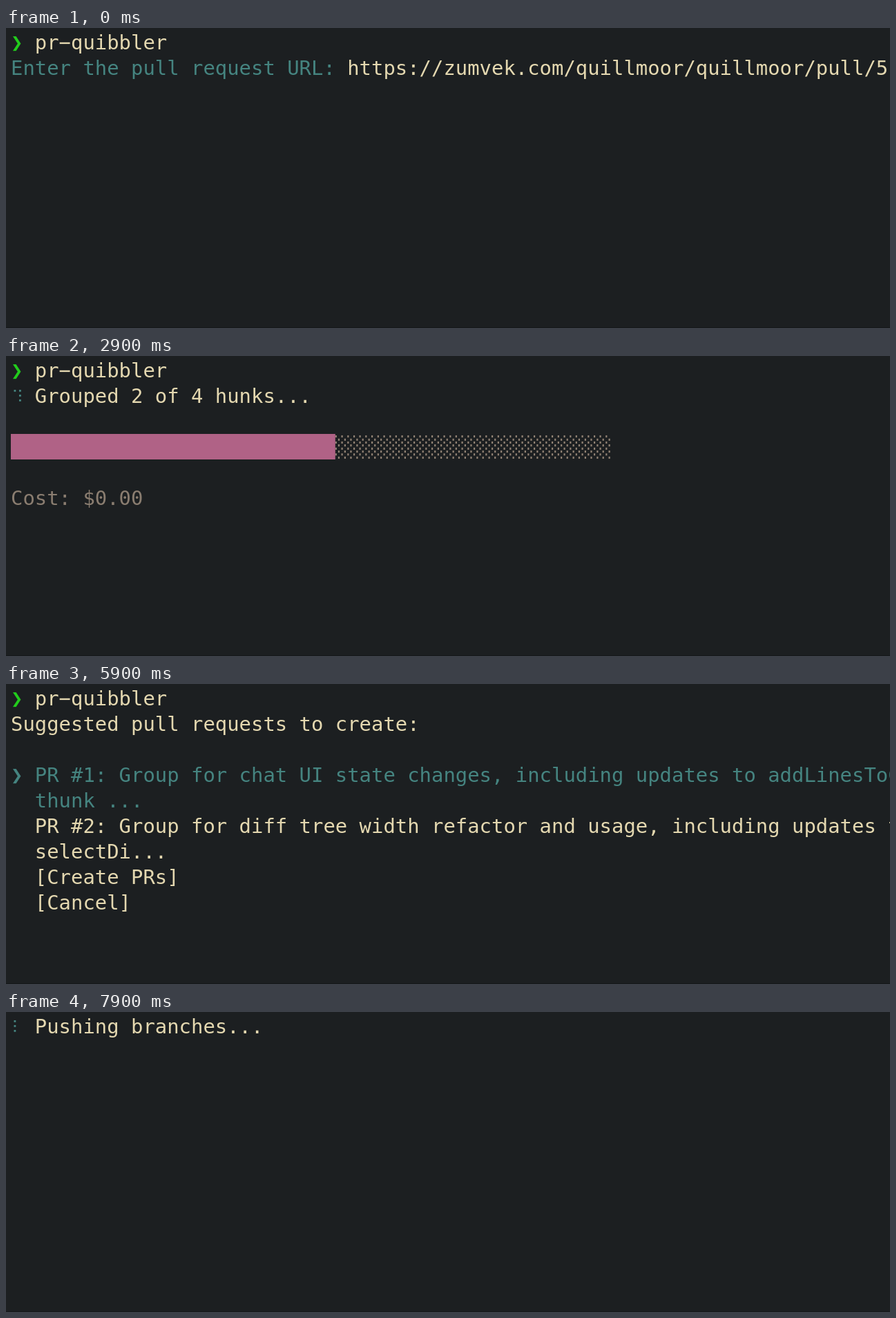
Recreate the animation shown at these times as an HTML page with a canvas. Size 1280x435 px, loop 8 s.

```html
<!DOCTYPE html>
<html lang="en">
<head>
<meta charset="utf-8">
<title>Terminal session</title>
<style>
  html, body { margin: 0; width: 100%; height: 100%; overflow: hidden; background: #1c1f21; }
  canvas { display: block; width: 1280px; height: 435px; }
</style>
</head>
<body>
<canvas id="stage" width="1280" height="435"></canvas>
<script>
const ctx = document.getElementById('stage').getContext('2d');
const LOOP = 8000, TICK = 100;
const LEFT = 7, CELL = 17.4, LINE = 37, BASE = 31, BAR_CELLS = 50;
const color = {
  back: '#1c1f21', text: '#e4d8b0', teal: '#458480', dim: '#8a7d70',
  green: '#22cc1c', pink: '#b06286', shade: '#928374'
};

const entries = [
  ['PR #1: Group for chat UI state changes, including updates to addLinesToC', 'thunk ...'],
  ['PR #2: Group for diff tree width refactor and usage, including updates to', 'selectDi...'],
  ['[Create PRs]'],
  ['[Cancel]']
];

// Each stage holds until the next one starts.
const stages = [
  { at: 0, draw: askUrl },
  { at: 500, draw: () => progress('Found 4 hunks in the PR #$51!', 9, '0.00') },
  { at: 1300, draw: t => progress('Grouped 0 of 4 hunks...', 17, '0.00', t) },
  { at: 2000, draw: t => progress('Grouped 1 of 4 hunks...', 22, '0.00', t) },
  { at: 2600, draw: t => progress('Grouped 2 of 4 hunks...', 27, '0.00', t) },
  { at: 3300, draw: t => progress('Grouped 3 of 4 hunks...', 32, '0.00', t) },
  { at: 3800, draw: t => progress('Refining groups...', 37, '0.01', t) },
  { at: 5000, draw: () => { prompt(); choices(1, 0); } },
  { at: 6400, draw: () => choices(0, 1) },
  { at: 6900, draw: () => choices(0, 2) },
  { at: 7200, draw: t => status(0, 'Creating branches...', t) },
  { at: 7600, draw: t => status(0, 'Pushing branches...', t) }
];

function write(text, col, row, fill = color.text) {
  ctx.fillStyle = fill;
  [...text].forEach((ch, i) => {
    if (ch !== ' ') ctx.fillText(ch, LEFT + (col + i) * CELL, BASE + row * LINE);
  });
}

function prompt() {
  write('❯', 0, 0, color.green);
  write('pr\u2212quibbler', 2, 0);
}

function askUrl() {
  prompt();
  write('Enter the pull request URL:', 0, 1, color.teal);
  write('https://zumvek.com/quillmoor/quillmoor/pull/51', 28, 1);
}

function spinner(row, t) {
  const frames = '⠋⠙⠹⠸⠼⠴⠦⠧⠇⠏';
  const index = Math.floor(t / 65.3 + 7.8) % frames.length;
  const bits = frames.charCodeAt(index) - 0x2800;
  ctx.fillStyle = color.teal;
  for (let dot = 0; dot < 6; dot++) {
    if (!(bits >> dot & 1)) continue;
    const x = 11.5 + Math.floor(dot / 3) * 7.5;
    const y = 12 + (dot % 3) * 7 + row * LINE;
    ctx.fillRect(x, y, 2.8, 2.8);
  }
}

function status(row, text, t) {
  spinner(row, t);
  write(text, 2, row);
}

function bar(filled) {
  write('░'.repeat(BAR_CELLS - filled), filled, 3, color.shade);
  ctx.fillStyle = color.pink;
  ctx.fillRect(LEFT, 113, filled * CELL, LINE);
}

function progress(text, filled, cost, t) {
  prompt();
  if (t === undefined) write(text, 0, 1);
  else status(1, text, t);
  bar(filled);
  write('Cost: $' + cost, 0, 5, color.dim);
}

function choices(row, selected) {
  write('Suggested pull requests to create:', 0, row);
  row += 2;
  entries.forEach((lines, i) => {
    const fill = i === selected ? color.teal : color.text;
    if (i === selected) write('❯', 0, row, fill);
    lines.forEach(line => write(line, 2, row++, fill));
  });
}

function render(now) {
  const t = Math.floor(now % LOOP / TICK) * TICK;
  ctx.fillStyle = color.back;
  ctx.fillRect(0, 0, 1280, 435);
  ctx.fillStyle = '#15181a';
  ctx.fillRect(0, 434, 1280, 1);
  ctx.font = '28.9px "DejaVu Sans Mono", monospace';
  stages.filter(s => s.at <= t).pop().draw(t);
}

const start = performance.now();
function loop() {
  render(performance.now() - start);
  requestAnimationFrame(loop);
}
loop();
</script>
</body>
</html>
```
